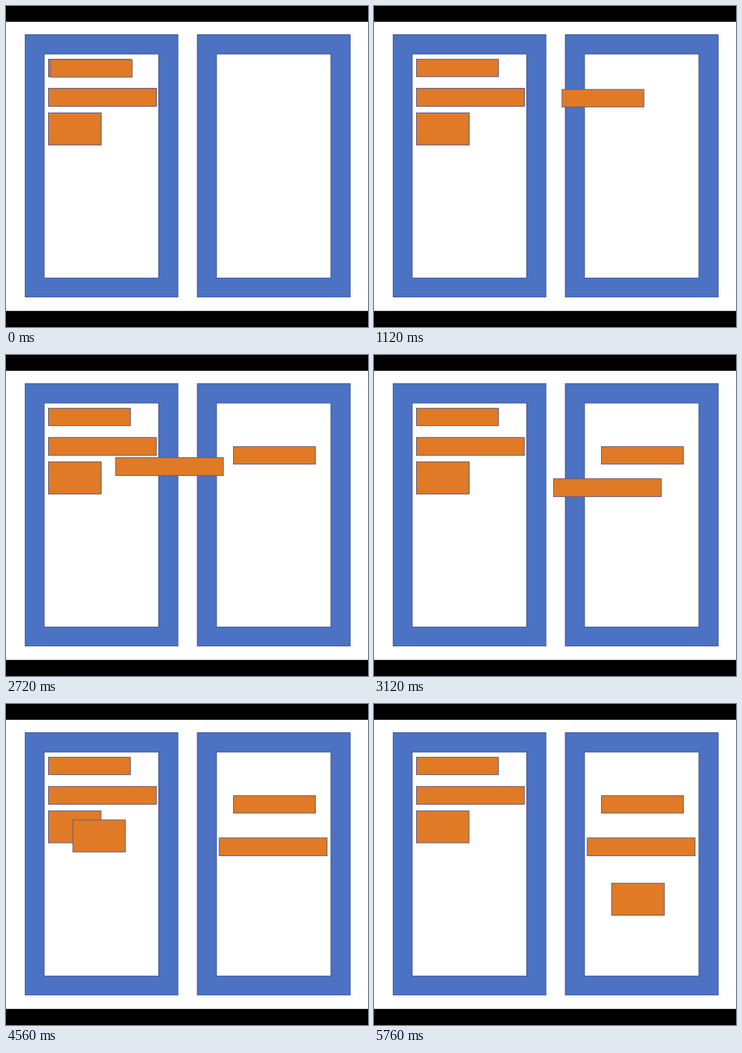
Animation, 499 px wide and 443 px high, one loop 5840 ms. Source, as an HTML page:

```html
<!DOCTYPE html>
<html lang="en">
<head>
<meta charset="utf-8">
<title>Blocks moving between frames</title>
<style>
  html, body { margin: 0; width: 100%; height: 100%; overflow: hidden; background: #000; }
  svg { display: block; width: 499px; height: 443px; }
  .panel { fill: #4c72c4; stroke: #3d5592; }
  .page { fill: #fff; stroke: #3d5592; }
  .block { fill: #e07a26; stroke: #625d7e; }
</style>
</head>
<body>
<svg id="stage" viewBox="0 0 499 443">
  <rect y="21.8" width="499" height="399" fill="#fff"/>
</svg>
<script>
const LOOP = 5840, STEP = 80;
const stage = document.getElementById('stage');

function rect(cls, x, y, width, height) {
  const el = document.createElementNS('http://www.w3.org/2000/svg', 'rect');
  const attrs = { class: cls, x, y, width, height };
  for (const key in attrs) el.setAttribute(key, attrs[key]);
  return stage.appendChild(el);
}

for (const x of [26.4, 263.8]) {
  rect('panel', x, 39.6, 210.6, 362);
  rect('page', x + 26.3, 66.2, 157.8, 309.2);
}

// Each copy speeds up from start to half, then brakes until end (ms).
const blocks = [
  { box: [58.5, 73.4, 113, 24.2], move: [255, 53], start: -130, half: 798, end: 1727 },
  { box: [58.5, 113.8, 148.7, 24.6], move: [235.4, 71], start: 1876, half: 2828, end: 3614 },
  { box: [58.5, 147.5, 72.5, 44.2], move: [269.2, 99.8], start: 4100, half: 5020, end: 5700 }
];

for (const b of blocks) rect('block', ...b.box);
for (const b of blocks) b.el = rect('block', ...b.box);

function travelled(t, { start, half, end }) {
  if (t <= start) return 0;
  if (t >= end) return 1;
  return t < half
    ? ((t - start) / (half - start)) ** 2 / 2
    : 1 - ((end - t) / (end - half)) ** 2 / 2;
}

function draw(now) {
  const t = Math.floor(now % LOOP / STEP) * STEP;
  for (const b of blocks) {
    const k = travelled(t, b), [dx, dy] = b.move;
    b.el.setAttribute('transform', `translate(${dx * k} ${dy * k})`);
  }
}

const origin = performance.now();
function tick() {
  draw(performance.now() - origin);
  requestAnimationFrame(tick);
}
tick();
</script>
</body>
</html>
```
